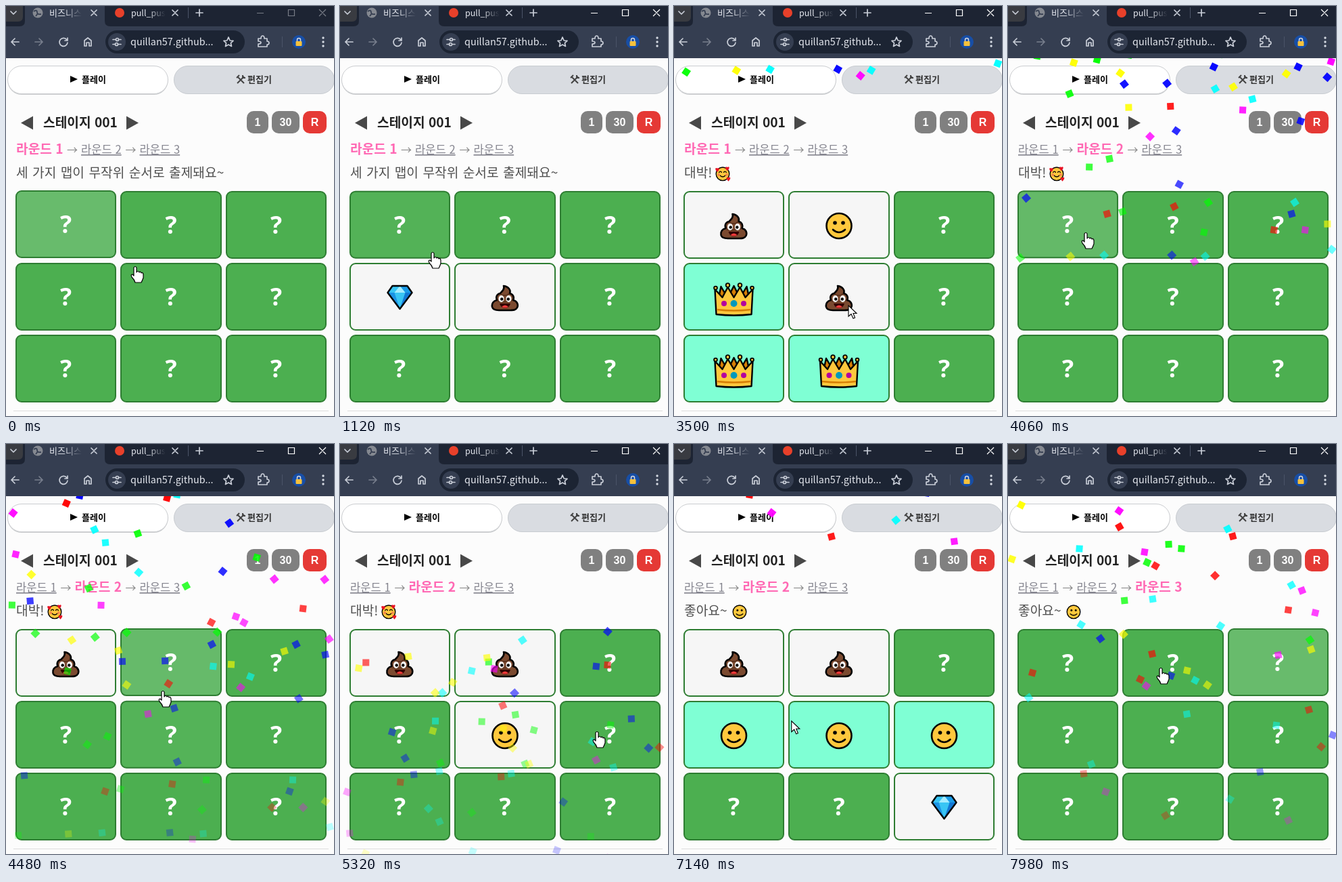
Write an HTML page that moves like this. It is 485x605 px and loops after 8000 ms.

```html
<!DOCTYPE html>
<html lang="ko">
<head>
<meta charset="utf-8">
<title>스테이지 001</title>
<style>
  html, body { margin: 0; width: 100%; height: 100%; overflow: hidden; background: #fcfcfc; }
  svg { display: block; width: 485px; height: 605px; }
  text { font-family: "Noto Sans CJK KR", "Noto Sans CJK", "Noto Sans", sans-serif; }
  .bold { font-weight: 700; }
  .mark { font: 700 36px "Open Sans", "Noto Sans", sans-serif; fill: #fff; text-anchor: middle; }
  .badge { font: 700 16px "Liberation Sans", Arial, sans-serif; fill: #fff; text-anchor: middle; }
  .line { fill: none; stroke: #c9ced8; stroke-width: 1.7; stroke-linecap: round; stroke-linejoin: round; }
</style>
</head>
<body>
<svg viewBox="0 0 485 605">
  <defs>
    <linearGradient id="fade">
      <stop offset=".5" stop-color="#e4e7ee"/><stop offset="1" stop-color="#e4e7ee" stop-opacity="0"/>
    </linearGradient>
    <g id="gem" stroke-linejoin="round">
      <path d="M-11-16H11L18-6 0 18-18-6Z" fill="#38c5f4"/>
      <path d="M11-16 18-6H8L0-16Z" fill="#1a9be8"/>
      <path d="M18-6 0 18 8-6Z" fill="#1277d4"/>
      <path d="M-18-6 0 18-8-6Z" fill="#1b92e4"/>
      <path d="M-8-6 0-16 8-6Z" fill="#a5ecff"/>
      <path d="M-11-16H11L18-6 0 18-18-6Z" fill="none" stroke="#000" stroke-width="2.4"/>
    </g>
    <g id="poop">
      <path d="M-2-16C5-15 9-10 7-5 12-4 14 1 12 5 18 6 20 12 18 16 16 20 12 20 8 20H-9C-14 20-18 19-19 15-20 10-17 6-12 5-14 0-12-4-7-5-5-8 0-10-2-16Z"
        fill="#7b4a30" stroke="#000" stroke-width="2.6" stroke-linejoin="round"/>
      <path d="M-6-3Q2 0 6-5M-11 7Q3 9 11 5" fill="none" stroke="#57301d" stroke-width="1.6"/>
      <ellipse cx="-5.5" cy="3" rx="4" ry="5" fill="#fff"/><ellipse cx="5.5" cy="3" rx="4" ry="5" fill="#fff"/>
      <circle cx="-4.8" cy="3.5" r="2.2"/><circle cx="4.8" cy="3.5" r="2.2"/>
      <path d="M-8 10H8Q6 17 0 17T-8 10Z" fill="#300"/><path d="M-5 15Q0 10 5 15 0 18-5 15Z" fill="#f03a3a"/>
    </g>
    <g id="smile">
      <circle cy="1.5" r="18.5" fill="#ffc83d" stroke="#000" stroke-width="2.6"/>
      <circle cx="-6" cy="-3" r="2.8"/><circle cx="6" cy="-3" r="2.8"/>
      <path d="M-9 7Q0 15 9 7" fill="none" stroke="#000" stroke-width="2.6" stroke-linecap="round"/>
    </g>
    <g id="love">
      <circle cy="1.5" r="18.5" fill="#ffc83d" stroke="#000" stroke-width="2.6"/>
      <path d="M-10-3Q-6-8-3-3M3-3Q6-8 10-3M-7 6Q0 13 7 6" fill="none" stroke="#000" stroke-width="2.6" stroke-linecap="round"/>
      <circle cx="-11" cy="4" r="4" fill="#f7894a"/><circle cx="11" cy="4" r="4" fill="#f7894a"/>
      <g fill="#e81224">
        <path id="heart" d="M13-7C5-14 7-21 13-17 19-21 21-14 13-7Z"/>
        <use href="#heart" x="-28" y="3"/><use href="#heart" x="3" y="29"/>
      </g>
    </g>
    <g id="crown" stroke="#000" stroke-width="2.4" stroke-linejoin="round">
      <path d="M-24 8-19-15-9 2 0-16 9 2 19-15 24 8Z" fill="#d67f05"/>
      <path d="M-26 26-28-11-17 1-9-14 0 1 9-14 17 1 28-11 26 26Q0 29-26 26Z" fill="#ffc83d"/>
      <g fill="#ffc83d" stroke-width="1.8">
        <circle cx="-27" cy="-13" r="2.4"/><circle cx="-9" cy="-17" r="2.8"/>
        <circle cx="9" cy="-17" r="2.8"/><circle cx="27" cy="-13" r="2.4"/>
      </g>
      <path d="M-25 19Q0 22 25 19" fill="none" stroke="#d67f05"/>
      <g stroke="none">
        <circle cx="-14.500" cy="10" r="4" fill="#b4009e"/><circle cy="10" r="5" fill="#0099bc"/><circle cx="14.500" cy="10" r="4" fill="#b4009e"/>
      </g>
    </g>
    <path id="arrow" d="M0 0V16L4 12.5 7 19 9.6 18 7 11.5H12Z" fill="#fff" stroke="#000" stroke-width="1.1"/>
    <path id="hand" d="M-2 1Q0-2 2 1V8Q4 5 6 8 8 6 9 9 11 7 12 11V16Q11 19 9 23H0Q-1 19-5 15-7 11-4 11L-2 13Z"
      fill="#fff" stroke="#000" stroke-width="1.2" stroke-linejoin="round"/>
  </defs>

  <rect width="485" height="605" fill="#fcfcfc"/>
  <g>
    <rect x="2.5" y="90" width="237" height="41" rx="20.5" fill="#cdcfd1"/>
    <rect x="2.5" y="88.5" width="237" height="41" rx="20.5" fill="#fff" stroke="#cbcdd0"/>
    <path d="M95 103V113L106 108Z"/>
    <text class="bold" x="112" y="112.5" font-size="13">플레이</text>
    <rect x="248.5" y="88.5" width="237" height="41" rx="20.5" fill="#d9dce1" stroke="#c8ccd1"/>
    <path d="M342 104 352 114M352 104 342 114M341 106 345 102M350 102V106H354" fill="none" stroke="#444" stroke-width="2"/>
    <text class="bold" x="357" y="112.5" font-size="13" fill="#333">편집기</text>
    <path d="M40 162.5V182.500L22 172.500ZM178 162.500V182.500L196 172.500Z" fill="#484848"/>
    <text class="bold" x="55" y="178.5" font-size="19.2" fill="#222">스테이지 001</text>
    <rect x="356" y="155" width="32" height="33" rx="10" fill="#808080"/>
    <rect x="393" y="155" width="41" height="33" rx="10" fill="#808080"/>
    <rect x="439" y="155" width="35" height="33" rx="10" fill="#e53935"/>
    <text class="badge" x="372" y="177">1</text>
    <text class="badge" x="413.5" y="177">30</text>
    <text class="badge" x="456.5" y="177">R</text>
    <path d="M11 597.5H477" stroke="#ddd"/>
  </g>

  <g id="game"></g>

  <g>
    <rect width="485" height="77" fill="#353e51"/>
    <path d="M0 0H485V30H154Q146 30 146 22V0H28V22Q28 30 20 30H0Z" fill="#1d2433"/>
    <path d="M0 0H25V16Q25 23 18 23H0Z" fill="#393b41"/>
    <path class="line" d="M7 8 11 12 15 8"/>
    <circle cx="47" cy="10" r="7.5" fill="#858991"/>
    <path d="M41 8Q46 5 46 9T52 12M44 15 47 11" fill="none" stroke="#353e51" stroke-width="1.8"/>
    <text x="64" y="15" font-size="13" fill="url(#fade)">비즈니스</text>
    <circle cx="168" cy="10" r="7" fill="#e8402a"/>
    <text x="185" y="15" font-size="12.5" fill="url(#fade)">pull_pus</text>
    <path class="line" d="M126 6 134 14M134 6 126 14M246 6 254 14M254 6 246 14M281 10H291M286 5V15"/>
    <path d="M269.5 2V18M408.5 45V61" stroke="#4b5468"/>
    <path id="controls" d="M371 10.5H381M417.5 5.5H426.5V14.5H417.5ZM463 5 473 15M473 5 463 15" fill="none" stroke-width="1.2"/>
    <path class="line" d="M19 53H8M13 48 8 53 13 58M90 50A6 6 0 1 0 91 54M91 47V51H87M116 51 121 47 126 51V59H123V54H119V59H116Z"/>
    <path class="line" d="M43 53H54M49 48 54 53 49 58" opacity=".45"/>
    <rect x="147" y="36" width="206" height="34" rx="17" fill="#1c2433"/>
    <circle cx="164" cy="53" r="13" fill="#353e51"/>
    <path class="line" d="M158 49.5H162M167 49.5H170M158 56.5H161M166 56.5H170"/>
    <circle class="line" cx="164.5" cy="49.5" r="2"/><circle class="line" cx="163.5" cy="56.5" r="2"/>
    <text x="184" y="58" font-size="14.4" fill="#e4e7ee">quillan57.github...</text>
    <path class="line" d="M329 46 331.2 51 336 51.4 332.4 54.7 333.5 59.5 329 57 324.5 59.5 325.6 54.7 322 51.4 326.8 51Z"/>
    <path class="line" d="M373 48H377Q377 44 379.5 44T382 48H386V52Q389 52 389 54.5T386 57V60H373V56Q377 56 377 54T373 52Z"/>
    <circle cx="433" cy="53" r="10" fill="#174ea6"/>
    <rect x="428.5" y="52" width="9" height="7" rx="1" fill="#f5c13c"/>
    <path d="M430.5 52V50A2.5 2.5 0 0 1 435.5 50V52" fill="none" stroke="#d5d8df" stroke-width="1.5"/>
    <g fill="#d5dae3"><circle cx="469" cy="47" r="1.7"/><circle cx="469" cy="53" r="1.7"/><circle cx="469" cy="59" r="1.7"/></g>
  </g>
</svg>

<script>
const LOOP = 8000, STEP = 140;
const GREEN = [76, 175, 80], LIGHT = [104, 187, 108], PAPER = [246, 246, 246];
const COLORS = ['red', 'lime', 'blue', 'yellow', 'magenta', 'cyan'];
const CELL = 149.33, PITCH = 155.33;

// Three fluid columns snapped to whole pixels.
const boxes = Array.from({ length: 9 }, (_, i) => {
  const left = 14 + (i % 3) * PITCH, x = Math.round(left);
  return { x, y: 273 + Math.floor(i / 3) * 106, w: Math.round(left + CELL) - x, h: 100 };
});

// Pointer visits: cell, hover start, hover end, and the icon revealed at the end.
const visits = [
  [0, -200, 20], [4, 120, 420, 'poop'], [3, 660, 800, 'gem'], [0, 1080, 1400, 'poop'],
  [1, 1780, 1960, 'smile'], [7, 2300, 2370, 'gem'], [6, 2700, 2850, 'gem'],
  [0, 3930, 4100, 'poop'], [4, 4200, 4375], [1, 4340, 4560, 'poop'], [4, 4920, 5050, 'smile'],
  [5, 5350, 5500, 'smile'], [8, 6000, 6150, 'gem'], [3, 6330, 6480, 'smile'],
  [2, 7600, 7990]
];
const rounds = [-1000, 3900, 7560];
const wins = [
  { at: 3395, cells: [3, 6, 7], icon: 'crown', pieces: 105 },
  { at: 6945, cells: [3, 4, 5], icon: 'smile', pieces: 62 }
];
const messages = [
  [0, '세 가지 맵이 무작위 순서로 출제돼요~'],
  [2000, '나만의 전략을 연구해보세요!'],
  [wins[0].at, '대박!', 'love', 72],
  [5400, '숨겨진 보석을 찾아보세요!'],
  [wins[1].at, '좋아요~', 'smile', 97]
];
// Pointer path: time, x, y.
const path = [
  [0, 191, 385], [140, 215, 425], [560, 215, 425], [700, 125, 430], [980, 110, 420], [1120, 137, 364],
  [1260, 115, 335], [1820, 115, 335], [1960, 240, 330], [2100, 262, 386], [2240, 288, 438],
  [2380, 290, 467], [2520, 267, 522], [2800, 110, 530], [3080, 110, 530], [3500, 258, 442],
  [3920, 115, 335], [4200, 115, 335], [4340, 215, 395], [4480, 232, 365], [4620, 242, 335], [4760, 242, 335],
  [4900, 245, 425], [5180, 245, 425], [5320, 380, 425], [5740, 390, 430], [6020, 385, 510],
  [6160, 352, 529], [6300, 130, 440], [7000, 115, 430], [7560, 350, 345], [7840, 365, 335], [7980, 226, 331]
];

const game = document.getElementById('game');
const controls = document.getElementById('controls');
const clamp = v => Math.max(0, Math.min(1, v));
const mix = (a, b, p) => a.map((v, i) => v + (b[i] - v) * p);
const random = n => { const v = Math.sin(n * 12.9898) * 43758.5453; return v - Math.floor(v); };
const use = (id, x, y, scale = 1) => `<use href="#${id}" transform="translate(${x} ${y}) scale(${scale})"/>`;

function pointerAt(t) {
  const i = Math.max(1, path.findIndex(p => p[0] >= t));
  const [a, b] = [path[i - 1], path[i]];
  return mix(a, b, (t - a[0]) / (b[0] - a[0])).slice(1);
}

function cellState(cell, t, round) {
  const state = { hover: 0, shown: 0, icon: null };
  for (const [c, start, end, icon] of visits) {
    if (c !== cell || start < rounds[round] || start > t) continue;
    state.hover = clamp((t - start) / 150) * (1 - clamp((t - end) / 150));
    if (icon && t >= end) Object.assign(state, { icon, shown: clamp((t - end) / 200) });
  }
  const win = wins[round];
  state.won = win && t >= win.at && win.cells.includes(cell);
  if (state.won) state.icon = win.icon;
  return state;
}

function drawCell({ x, y, w, h }, { hover, shown, icon, won }) {
  const top = y - hover, cx = x + w / 2;
  const fill = won ? '#7fffd4' : `rgb(${mix(mix(GREEN, LIGHT, hover), PAPER, shown)})`;
  return `<rect x="${x + 1}" y="${top + 1}" width="${w - 2}" height="${h - 2}" rx="8" fill="${fill}" stroke="#2e7d32" stroke-width="2"/>` +
    (icon ? use(icon, cx, top + 50) : `<text class="mark" x="${cx}" y="${top + 63}">?</text>`);
}

function drawRounds(active) {
  let x = 15, out = '';
  for (let i = 0; i < 3; i++) {
    const on = i === active;
    out += `<text x="${x}" y="218" ${on
      ? 'class="bold" font-size="19.2" fill="#ff69b4"'
      : 'font-size="16.6" fill="#85858f" text-decoration="underline"'}>라운드 ${i + 1}</text>`;
    x += on ? 75 : 65.5;
    if (i < 2) out += `<text x="${x}" y="218" font-size="16" fill="#888">→</text>`;
    x += 21;
  }
  return out;
}

function drawMessage(t) {
  const [, text, icon, x] = messages.filter(m => m[0] <= t).pop();
  return `<text x="15" y="253" font-size="19.2" word-spacing="1" fill="#505050">${text}</text>` +
    (icon ? use(icon, x, 247, .53) : '');
}

function drawConfetti(t) {
  let out = '';
  wins.forEach(({ at, pieces }, w) => {
    for (let i = 0; i < pieces; i++) {
      const seed = w * 500 + i * 4 + 1;
      const p = (t - at - random(seed) * 1500) / 1400;
      if (p <= 0 || p >= 1) continue;
      const x = random(seed + 1) * 485, y = 65 + 686 * p;
      out += `<rect x="-5" y="-5" width="10" height="10" fill="${COLORS[Math.floor(random(seed + 2) * 6)]}" opacity="${1 - p}"
        transform="translate(${x} ${y}) rotate(${720 * p})"/>`;
    }
  });
  return out;
}

function drawPointer(t, cells) {
  const [px, py] = pointerAt(t);
  const clickable = boxes.some(({ x, y, w, h }, i) =>
    !cells[i].icon && px >= x && px <= x + w && py >= y - 1 && py <= y + h);
  return use(clickable ? 'hand' : 'arrow', px, py);
}

function render(t) {
  const round = rounds.filter(start => start <= t).length - 1;
  const cells = boxes.map((_, i) => cellState(i, t, round));
  controls.setAttribute('stroke', t < 420 ? '#777c86' : '#fff');
  game.innerHTML = drawRounds(round) + drawMessage(t) +
    boxes.map((box, i) => drawCell(box, cells[i])).join('') + drawConfetti(t) + drawPointer(t, cells);
}

let shownTime = -1;
function tick() {
  const t = Math.floor(performance.now() % LOOP / STEP) * STEP;
  if (t !== shownTime) render(shownTime = t);
  requestAnimationFrame(tick);
}
tick();
</script>
</body>
</html>
```
